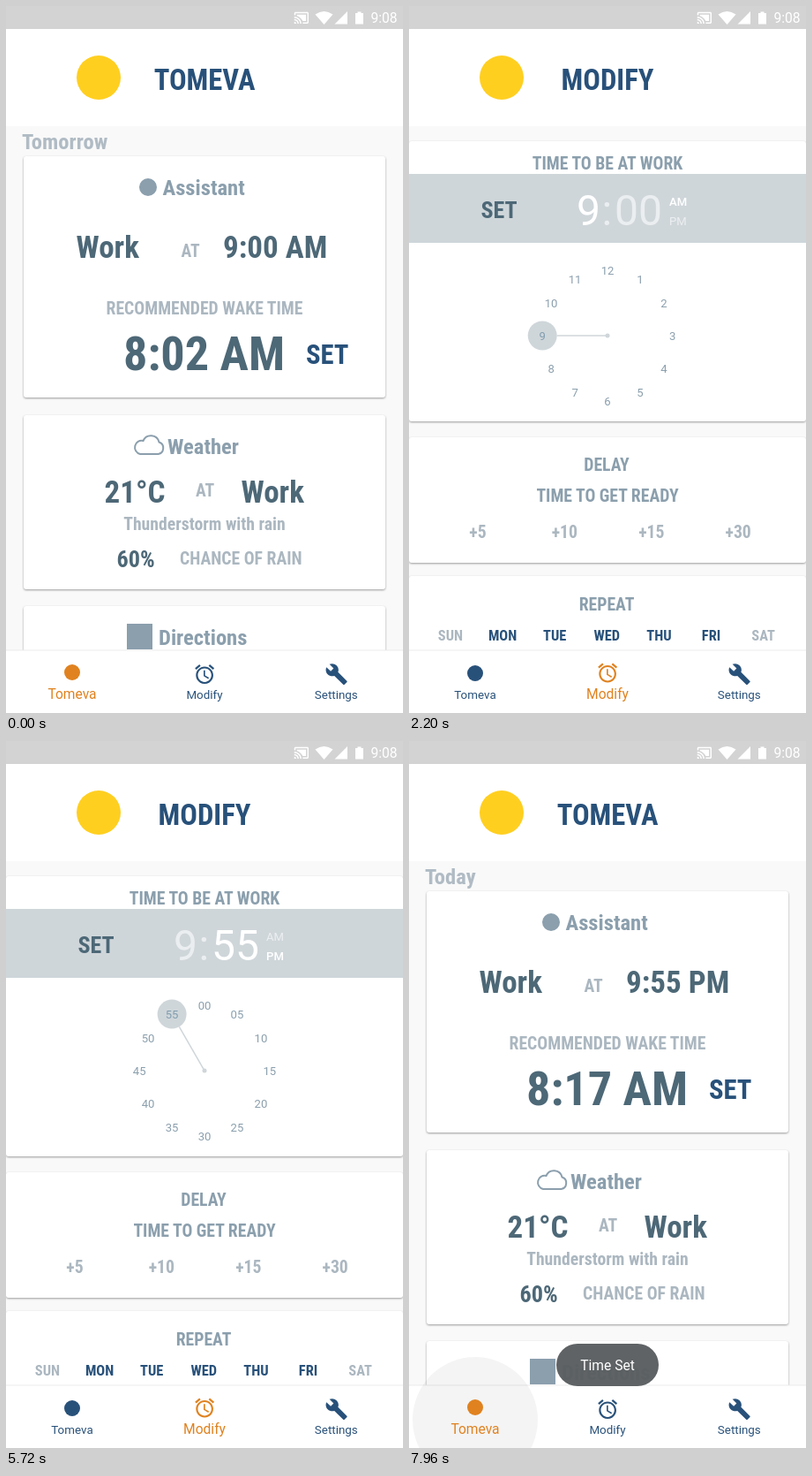
These frames come from a looping animation (450 px wide and 800 px high, 8000 ms). An HTML page:

```html
<!DOCTYPE html>
<html lang="en">
<head>
<meta charset="utf-8">
<title>Alarm assistant</title>
<style>
html, body { margin: 0; width: 100%; height: 100%; overflow: hidden; background: #f9f9f9; }
svg { display: block; width: 100%; height: 100%; }
text { font-family: Roboto, sans-serif; white-space: pre; }
.c { font-family: "Roboto Condensed", Roboto, sans-serif; font-stretch: 75%; font-weight: 700; }
.card { fill: #fff; filter: drop-shadow(0 1px 1px rgba(0,0,0,.38)); }
</style>
</head>
<body>
<svg id="stage" viewBox="0 0 450 800"></svg>
<script>
const LOOP = 8000;
const NAVY = '#28517a', ORANGE = '#e0821f', SLATE = '#4d6877', STEEL = '#8b9fad', PALE = '#abb7c0', BAND = '#cfd6da';
const HEAD = 24.6, LABEL = 19.7, SMALL = 13.4, LARGE = 15.6;
const stage = document.getElementById('stage');

function add(parent, tag, attrs, content) {
  const el = document.createElementNS('http://www.w3.org/2000/svg', tag);
  set(el, attrs);
  if (content !== undefined) el.textContent = content;
  return parent.appendChild(el);
}
function set(el, attrs) {
  for (const k in attrs) el.setAttribute(k, attrs[k]);
}
const group = parent => add(parent, 'g', {});
const rect = (p, x, y, width, height, fill, rx = 0) => add(p, 'rect', { x, y, width, height, fill, rx });
const circle = (p, cx, cy, r, fill) => add(p, 'circle', { cx, cy, r, fill });
const card = (p, x, y, w, h) => rect(p, x, y, w, h, '#fff', 3).setAttribute('class', 'card');
const icon = (p, d, fill, x, y, s) => add(p, 'path', { d, fill, transform: `translate(${x} ${y}) scale(${s})` });
const plain = (p, s, x, y, size, fill, anchor = 'start') =>
  add(p, 'text', { x, y, 'font-size': size, fill, 'text-anchor': anchor }, s);
function bold(p, s, x, y, size, fill, anchor) {
  const el = plain(p, s, x, y, size, fill, anchor);
  el.setAttribute('class', 'c');
  return el;
}
const mid = (p, s, x, y, size, fill) => bold(p, s, x, y, size, fill, 'middle');

const clamp = v => Math.max(0, Math.min(1, v));
const span = (t, from, to) => clamp((t - from) / (to - from));
const smooth = x => 0.5 - Math.cos(Math.PI * x) / 2;
const slowDown = x => 1 - (1 - x) * (1 - x);

// Status bar and header
rect(stage, 0, 0, 450, 800, '#f9f9f9');
rect(stage, 0, 26, 450, 110, '#fff');
rect(stage, 0, 0, 450, 26, '#d3d3d3');
icon(stage, 'M21 3H3c-1.1 0-2 .9-2 2v3h2V5h18v14h-7v2h7c1.1 0 2-.9 2-2V5c0-1.1-.9-2-2-2zM1 18v3h3c0-1.66-1.34-3-3-3zm0-4v2c2.76 0 5 2.24 5 5h2c0-3.87-3.13-7-7-7zm0-4v2c4.97 0 9 4.03 9 9h2c0-6.08-4.93-11-11-11zM5 7v2c4 1 7 4 9 8h5V7z', '#fff', 326, 4.5, 0.74);
add(stage, 'path', { d: 'M350.5 9.5Q360.5 2.5 370.5 9.5L360.5 21ZM387 6V20.5H372.5ZM396 8h2.5v-1.5h4v1.5h2.5v12.5h-9z', fill: '#fff' });
plain(stage, '9:08', 413.5, 19, LARGE, '#fff');
circle(stage, 105, 81, 25, '#ffcf20');
const title = mid(stage, '', 225, 95, 32.6, NAVY);

// Home page
const home = group(stage);
const day = bold(home, '', 18, 162, HEAD, '#b0bbc4');
card(home, 20, 170, 410, 273);
circle(home, 161, 205, 10, STEEL);
bold(home, 'Assistant', 177.5, 214, HEAD, STEEL);
bold(home, 'Work', 79.5, 285, 35, SLATE);
bold(home, 'AT', 198.5, 284, LABEL, PALE);
const due = bold(home, '', 246, 285, 35, SLATE);
mid(home, 'RECOMMENDED WAKE TIME', 225, 348.5, LABEL, PALE);
const wake = bold(home, '', 133, 412, 54.2, SLATE);
bold(home, 'SET', 340, 405, 30.6, NAVY);

card(home, 20, 463, 410, 197);
add(home, 'path', {
  d: 'M152 507h20.5a7 7 0 0 0 1-13.5a9.5 9.5 0 0 0-18-1.5a7.5 7.5 0 0 0-3.500 15z',
  fill: 'none', stroke: STEEL, 'stroke-width': 2
});
bold(home, 'Weather', 183, 507, HEAD, STEEL);
bold(home, '21°C', 111.5, 561.5, 35, SLATE);
bold(home, 'AT', 215, 555, LABEL, PALE);
bold(home, 'Work', 266.5, 561.5, 35, SLATE);
mid(home, 'Thunderstorm with rain', 225, 593, LABEL, PALE);
bold(home, '60%', 125.5, 635, 26.2, SLATE);
bold(home, 'CHANCE OF RAIN', 197, 632, LABEL, PALE);

card(home, 20, 679, 410, 130);
rect(home, 137, 699, 29, 29, STEEL);
bold(home, 'Directions', 173, 723, HEAD, STEEL);

// Modify page
const modify = group(stage);
card(modify, 0, 153, 450, 317);
mid(modify, 'TIME TO BE AT WORK', 225, 185, LABEL, STEEL);
rect(modify, 0, 190, 450, 78, BAND);
const press = rect(modify, 71, 208, 62, 44, '#000', 2);
mid(modify, 'SET', 102, 240, 26, SLATE);
const hour = plain(modify, '9', 190, 248, 48, '#fff');
plain(modify, ':', 218.5, 248, 48, '#fff').setAttribute('opacity', 0.6);
const minute = plain(modify, '', 233, 248, 48, '#fff');
const am = plain(modify, 'AM', 295, 226, 13.1, '#fff');
const pm = plain(modify, 'PM', 295, 248, 13.1, '#fff');

const CX = 225, CY = 373, DIAL = 73.8, KNOB = 16.5;
const polar = (deg, r) => [CX + r * Math.sin(deg * Math.PI / 180), CY - r * Math.cos(deg * Math.PI / 180)];
const hourRing = group(modify), minuteRing = group(modify);
for (let i = 0; i < 12; i++) {
  const [x, y] = polar(i * 30, DIAL);
  plain(hourRing, i || 12, x, y + 4.7, 13.1, STEEL, 'middle');
  plain(minuteRing, String(i * 5).padStart(2, '0'), x, y + 4.7, 13.1, STEEL, 'middle');
}
const hand = add(modify, 'line', { x1: CX, y1: CY, stroke: BAND, 'stroke-width': 1.5 });
circle(modify, CX, CY, 2.5, BAND);
const knob = circle(modify, 0, 0, KNOB, BAND);
const picked = plain(modify, '', 0, 0, 13.1, '#829dae', 'middle');

card(modify, 0, 488, 450, 142);
mid(modify, 'DELAY', 224, 526, LABEL, STEEL);
mid(modify, 'TIME TO GET READY', 225, 561, LABEL, STEEL);
['+5', '+10', '+15', '+30'].forEach((s, i) => mid(modify, s, 78 + i * 98.4, 602, LABEL, PALE));
card(modify, 0, 645, 450, 160);
mid(modify, 'REPEAT', 224, 684, LABEL, STEEL);
['SUN', 'MON', 'TUE', 'WED', 'THU', 'FRI', 'SAT'].forEach((s, i) =>
  mid(modify, s, 47 + i * 59.1, 718, 16.4, i % 6 ? NAVY : PALE));

// Bottom navigation
rect(stage, 0, 729, 450, 71, '#fff');
rect(stage, 0, 728.5, 450, 1, '#ececec');
const glow = circle(stage, 225, 768, 71, '#5fc8d0');
const ripple = circle(stage, 0, 0, 0, '#000');
const ALARM = 'M22 5.72l-4.6-3.86-1.29 1.53 4.6 3.86L22 5.72zM7.88 3.39L6.6 1.86 2 5.71l1.29 1.53 4.59-3.85zM12.5 8H11v6l4.75 2.85.75-1.23-4-2.37V8zM12 4c-4.97 0-9 4.03-9 9s4.02 9 9 9 9-4.03 9-9-4.03-9-9-9zm0 16c-3.87 0-7-3.13-7-7s3.13-7 7-7 7 3.13 7 7-3.13 7-7 7z';
const WRENCH = 'M22.7 19l-9.1-9.1c.9-2.3.4-5-1.5-6.9-2-2-5-2.4-7.4-1.3L9 6 6 9 1.6 4.7C.4 7.1.9 10.1 2.9 12.1c1.9 1.9 4.6 2.4 6.9 1.5l9.1 9.1c.4.4 1 .4 1.4 0l2.3-2.3c.5-.4.5-1.1.1-1.4z';
const homeIcon = circle(stage, 75, 755, 9, ORANGE);
const alarmIcon = icon(stage, ALARM, NAVY, 212, 743, 1.094);
icon(stage, WRENCH, NAVY, 361.5, 743, 1.094);
const homeLabel = plain(stage, 'Tomeva', 75, 784, SMALL, NAVY, 'middle');
const modifyLabel = plain(stage, 'Modify', 225, 784, SMALL, NAVY, 'middle');
plain(stage, 'Settings', 374.3, 784, SMALL, NAVY, 'middle');

// Toast
const toast = group(stage);
rect(toast, 167, 682, 116, 48, '#5a5e60', 24).setAttribute('fill-opacity', 0.97);
plain(toast, 'Time Set', 225, 712, LARGE, '#fff', 'middle');

const OPEN = 240, PM_TAP = 3200, TO_MINUTES = 4605, PICK = 5400, TOAST = 6680, BACK = 7820;

function drawDial(t) {
  const k = smooth(span(t, TO_MINUTES, TO_MINUTES + 500));
  const deg = t >= PICK ? 330 : 270 * (1 - k);
  const [x, y] = polar(deg, DIAL), [x2, y2] = polar(deg, DIAL - KNOB);
  set(hand, { x2, y2 });
  set(knob, { cx: x, cy: y });
  set(hourRing, { opacity: 1 - k });
  set(minuteRing, { opacity: k });
  set(picked, { x, y: y + 4.7 });
  picked.textContent = k === 0 ? '9' : k < 1 ? '' : t >= PICK ? '55' : '00';

  const minutes = t >= TO_MINUTES, evening = t >= PM_TAP;
  minute.textContent = t >= PICK ? '55' : '00';
  set(hour, { opacity: minutes ? 0.6 : 1 });
  set(minute, { opacity: minutes ? 1 : 0.6 });
  set(am, { opacity: evening ? 0.6 : 1, 'font-weight': evening ? 400 : 500 });
  set(pm, { opacity: evening ? 1 : 0.6, 'font-weight': evening ? 500 : 400 });
}

function drawNav(t, onModify) {
  const k = smooth(span(t, OPEN, OPEN + 115)) - smooth(span(t, BACK, BACK + 115));
  set(homeLabel, { 'font-size': LARGE + (SMALL - LARGE) * k, fill: onModify ? NAVY : ORANGE });
  set(modifyLabel, { 'font-size': SMALL + (LARGE - SMALL) * k, fill: onModify ? ORANGE : NAVY });
  set(homeIcon, { fill: onModify ? NAVY : ORANGE, cy: 754 + k });
  set(alarmIcon, { fill: onModify ? ORANGE : NAVY, transform: `translate(212 ${743 - 1.5 * k}) scale(1.094)` });

  if (t < 4000) {
    const grow = span(t, 195, 400), fade = 1 - span(t, 400, 840);
    set(ripple, { cx: 220 + 5 * grow, cy: 777 - 9 * grow, r: 71 * grow, opacity: 0.08 * fade });
    set(glow, { opacity: 0.03 * span(t, 120, 240) * fade });
  } else {
    set(ripple, { cx: 75, cy: 768, r: 71 * slowDown(span(t, 7740, 7950)), opacity: 0.045 });
    set(glow, { opacity: 0 });
  }
}

function draw(t) {
  const onModify = t >= OPEN && t < BACK, late = t >= BACK;
  title.textContent = onModify ? 'MODIFY' : 'TOMEVA';
  set(home, { display: onModify ? 'none' : 'inline' });
  set(modify, { display: onModify ? 'inline' : 'none' });
  day.textContent = late ? 'Today' : 'Tomorrow';
  due.textContent = late ? '9:55 PM' : '9:00 AM';
  wake.textContent = late ? '8:17 AM' : '8:02 AM';
  drawDial(t);
  drawNav(t, onModify);
  set(press, { opacity: 0.1 * span(t, 6540, 6640) * (1 - span(t, 6840, 7320)) });
  set(toast, { opacity: slowDown(span(t, TOAST, TOAST + 500)) });
}

const start = performance.now();
function tick() {
  draw((performance.now() - start) % LOOP);
  requestAnimationFrame(tick);
}
draw(0);
requestAnimationFrame(tick);
</script>
</body>
</html>
```
